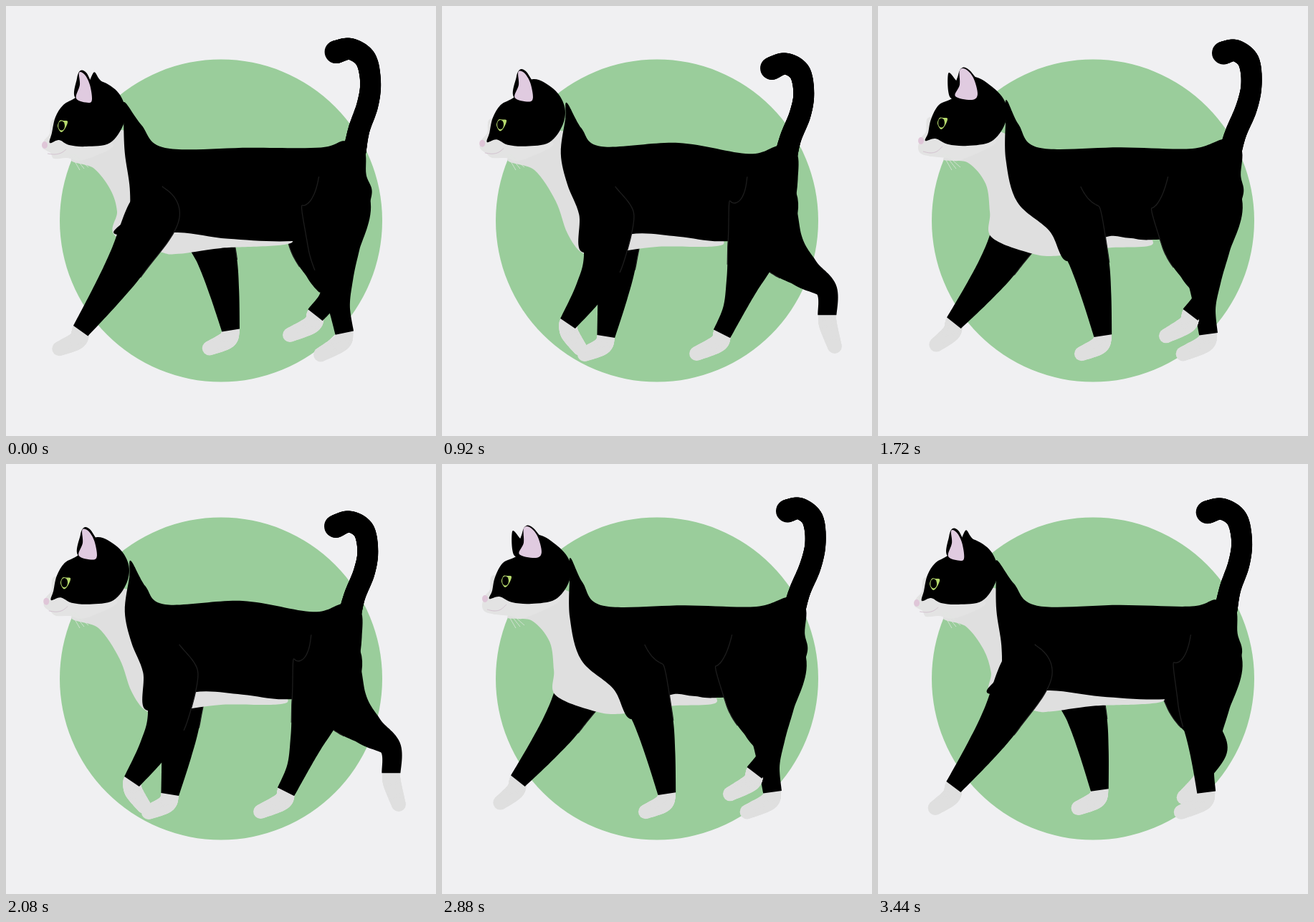
Write an HTML page with a canvas that moves like this. It is 600 by 600 pixels and loops after 3.48 s.

```html
<!DOCTYPE html>
<html lang="en">
<head>
<meta charset="utf-8">
<title>Walking cat</title>
<style>
html, body { margin: 0; width: 100%; height: 100%; overflow: hidden; background: #f0f0f2; }
canvas { display: block; }
</style>
</head>
<body>
<canvas id="stage" width="600" height="600"></canvas>
<script>
const ctx = document.getElementById('stage').getContext('2d');
const STRIDE = 1160, STEP = 40;
const BLACK = '#000', WHITE = '#dfdfdf', PINK = '#e0cbe0', LIME = '#b6da6d', EDGE = '#1d1d1d';

const wave = (t, peak, period = STRIDE) => Math.cos(2 * Math.PI * (t - peak) / period);
const sway = t => (1 - wave(t, 0)) / 2;
const bob = t => (1 - wave(t, 40, STRIDE / 2)) / 2;

// Body points: [x, y, then the shift by sway (x, y), then the shift by bob (x, y)].
const back = [
  [165, 134, 14, -3, 4, 2], [189, 166, 7, -1, 3, 5], [222, 198, 3, 0, -1, -2], [340, 198, 0, 0, -10, -7],
  [440, 197, 0, 1, -12, 9], [473, 188, 12, -3, -7, 8], [500, 200, 8, 0, -8, 5], [503, 235, 4, 0, -8, 7],
  [511, 264, 0, 0, -20, 18], [484, 316, -3, 0, -4, 2]
];
const front = [
  [164, 157, 14, -2, 3, 1], [166, 205, 13, 10, -5, -3], [173, 255, 22, 20, -6, -13], [171, 293, 69, 22, -5, -10],
  [153, 318, 112, 37, 2, 12], [240, 316, 77, 7, -6, 0], [310, 325, 40, -1, 5, -3], [400, 328, -16, -2, -2, 1]
];
const chest = [
  [92, 212], [122, 226, 3, -8, 6, 6], [145, 255, 4, -9, 12, 20], [154, 285, 0, 0, 21, 32], [150, 319, 4, 1, 44, 25],
  [215, 343, -5, 1, 10, 4], [240, 346, 10, 3, 10, -5], [300, 338, 18, 0, -7, -2], [400, 329, -16, 2, -1, 2],
  [330, 290], [170, 175]
];
const tail = [[461, 63], [481, 59], [502, 73], [509, 105], [505, 137], [493, 172], [487, 202]];

const skull = [
  [98, 127, 8], [80, 138, 5], [69, 155, 5, 3], [64, 177, 6], [61, 191, 5, -3], [74, 187, 6, -2], [88, 194, 10, -1],
  [112, 196, 13, -1], [145, 191, 13, -2], [164, 165, 13], [166, 140, 13, -2], [152, 116, 10, -1], [123, 104, 8, -5]
];
const farEar = [[122, 93, -24, 1], [132, 104, -23], [154, 124, -29, 2], [115, 126, -14, 2]];
const nearEar = [[98, 129, 11, -2], [99, 101, 13, -5], [104, 90, 14, -4], [112, 93, 15, -4], [121, 108, 19, -5], [140, 126, 25, -4]];
const innerEar = [[98, 129, 10, -3], [103, 110, 11], [102, 93, 12, -3], [110, 96, 12, -8], [117, 110, 16, -10], [120, 130, 19, -7], [115, 135, 16, -4]];
const muzzle = [
  [68, 158, 6, -3], [61, 178, 6, -3], [53, 188, 7, -4], [51, 198, 5, -1], [62, 205, -2, 1], [67, 213, 8, -3],
  [85, 212, 10], [108, 215, 7], [150, 195, 15, -5], [120, 180, 10]
];
const mouth = [[58, 206, 5, -3], [68, 207, 5, -2], [77, 205, 5, -2], [84, 200, 6, -4]];
const face = [[78, 167, 11, -4], [54, 194, 6, -6]];

const place = (points, t) => {
  const s = sway(t), b = bob(t);
  return points.map(([x, y, sx = 0, sy = 0, bx = 0, by = 0]) => [x + s * sx + b * bx, y + s * sy + b * by]);
};

const tailPose = t => tail.map(([x, y], i) =>
  [x + sway(t) * (22 - 3 * i) - bob(t) * 9, y + bob(t) * (24 - 2.8 * i) + sway(t) * i]);

// Point part way from a to b, pushed sideways; a positive bend points to the rear.
function along(a, b, part, bend) {
  const dx = b[0] - a[0], dy = b[1] - a[1], d = Math.hypot(dx, dy);
  return [a[0] + dx * part + bend * dy / d, a[1] + dy * part - bend * dx / d];
}

// Degrees from straight down, positive to the rear.
function reach([x, y], degrees, length) {
  const a = degrees * Math.PI / 180;
  return [x + length * Math.sin(a), y + length * Math.cos(a)];
}

function paw(ankle, curl, length) {
  tube([ankle, reach(ankle, curl * .4, 14), reach(ankle, curl, length)], [12, 12.5, 10], WHITE);
}

function frontLeg(t, drop) {
  const shoulder = [208 + 65 * sway(t), 285];
  const wrist = [209 - 105 * wave(t, -10), 456 + drop + 13 * wave(t, 330)];
  const lift = Math.max(0, wave(t, 850));
  const bend = 5 + 13 * lift;
  paw(wrist, -50 + 82 * lift, 39);
  const limb = [[shoulder[0] + 6, 251], shoulder, along(shoulder, wrist, .4, bend), along(shoulder, wrist, .68, bend * .8), wrist];
  line(ribbon(limb, [4, 36, 28, 21, 12.5], BLACK).rear.slice(0, 36), EDGE, 1.3);
}

function hindLeg(t) {
  const hip = [460 - 32 * sway(t), 270];
  const phase = 2 * Math.PI * (t - 250) / STRIDE;
  const ankle = [454 + 85 * Math.cos(phase) + 10 * Math.sin(2 * phase), 444 + 16 * wave(t, 1040)];
  const hock = reach(ankle, 167 - 32 * wave(t, 720), 36);
  const bend = -6 - 10 * wave(t, 330);
  paw(ankle, -52 + 68 * Math.max(0, wave(t, 290)), 45);
  const limb = [[hip[0] - 20, 236], hip, along(hip, hock, .45, bend), along(hip, hock, .76, bend * .6), hock, ankle];
  line(ribbon(limb, [4, 47, 36, 23, 15, 13], BLACK).fore.slice(0, 42), EDGE, 1.3);
}

function curve(pts, closed) {
  const n = pts.length;
  const p = i => closed ? pts[(i + n) % n] : pts[Math.max(0, Math.min(n - 1, i))];
  ctx.beginPath();
  ctx.moveTo(...pts[0]);
  for (let i = 0; i < (closed ? n : n - 1); i++) {
    const [a, b, c, d] = [p(i - 1), p(i), p(i + 1), p(i + 2)];
    ctx.bezierCurveTo(b[0] + (c[0] - a[0]) / 6, b[1] + (c[1] - a[1]) / 6,
                      c[0] - (d[0] - b[0]) / 6, c[1] - (d[1] - b[1]) / 6, c[0], c[1]);
  }
}

function blob(pts, color) {
  curve(pts, true);
  ctx.fillStyle = color;
  ctx.fill();
}

function line(pts, color, width) {
  curve(pts, false);
  ctx.strokeStyle = color;
  ctx.lineWidth = width;
  ctx.stroke();
}

function oval(x, y, rx, ry, color) {
  ctx.beginPath();
  ctx.ellipse(x, y, rx, ry, 0, 0, 2 * Math.PI);
  ctx.fillStyle = color;
  ctx.fill();
}

// Dense [x, y, radius] samples of a spline through the joints.
function sample(joints, radii) {
  const pts = joints.map((p, i) => [...p, radii[i]]), out = [], last = pts.length - 1;
  for (let i = 0; i < last; i++) {
    const a = pts[Math.max(0, i - 1)], b = pts[i], c = pts[i + 1], d = pts[Math.min(last, i + 2)];
    for (let u = 0; u < 1; u += 1 / 16)
      out.push(b.map((v, k) => v + u / 2 * (c[k] - a[k] + u * (2 * a[k] - 5 * v + 4 * c[k] - d[k]
        + u * (3 * v - a[k] - 3 * c[k] + d[k])))));
  }
  return [...out, pts[last]];
}

const tube = (joints, radii, color) => sample(joints, radii).forEach(([x, y, r]) => oval(x, y, r, r, color));

function ribbon(joints, radii, color) {
  const mid = sample(joints, radii), fore = [], rear = [];
  mid.forEach(([x, y, r], i) => {
    const a = mid[Math.max(0, i - 1)], b = mid[Math.min(mid.length - 1, i + 1)];
    const dx = b[0] - a[0], dy = b[1] - a[1], s = r / Math.hypot(dx, dy);
    fore.push([x - dy * s, y + dx * s]);
    rear.push([x + dy * s, y - dx * s]);
  });
  ctx.beginPath();
  [...fore, ...[...rear].reverse()].forEach(p => ctx.lineTo(...p));
  ctx.fillStyle = color;
  ctx.fill();
  return { fore, rear };
}

function drawHead(t) {
  const [[ex, ey], [nx, ny]] = place(face, t);
  blob(place(muzzle, t), '#e3e3e3');
  [farEar, skull, nearEar].forEach(part => blob(place(part, t), BLACK));
  blob(place(innerEar, t), PINK);
  oval(nx, ny, 4, 5, '#dfc6d8');
  line(place(mouth, t), '#d3c3d0', 1);
  blob([[ex - 6, ey + 1], [ex - 3, ey - 7], [ex + 2, ey - 7], [ex + 8, ey - 6], [ex + 5, ey + 3], [ex - 1, ey + 9]], LIME);
  oval(ex - .5, ey, 4.5, 6.6, BLACK);
  for (let i = 0; i < 3; i++)
    line([[90 + i * 3, 207], [96 + i * 5, 217], [103 + i * 6, 229 - i * 2]], '#e0e6e0', .8);
}

function draw(now) {
  const t = Math.floor(now / STEP) * STEP % STRIDE;
  ctx.fillStyle = '#f0f0f2';
  ctx.fillRect(0, 0, 600, 600);
  oval(300, 299.5, 225, 225, '#9acd9b');

  hindLeg(t + STRIDE / 2);
  frontLeg(t + STRIDE / 2 - 25, -8);
  tube(tailPose(t), [16, 15, 15, 14.5, 15, 15, 16], BLACK);
  blob(place(chest, t), WHITE);
  blob([...place(front, t), ...place(back, t).reverse()], BLACK);
  hindLeg(t + 12);
  frontLeg(t, 0);
  drawHead(t);
  requestAnimationFrame(() => draw(performance.now() - start));
}

const start = performance.now();
draw(0);
</script>
</body>
</html>
```
